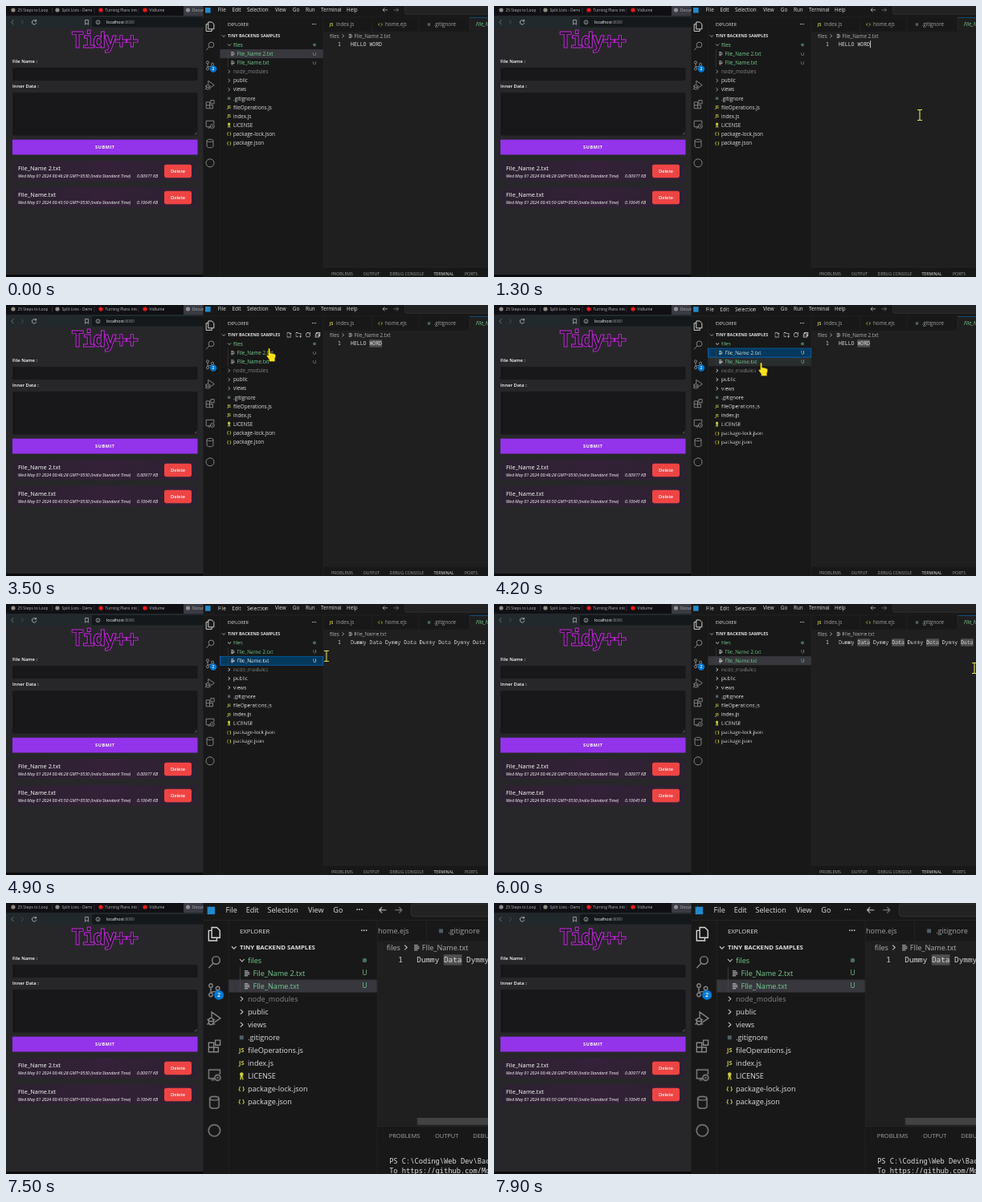
An HTML page for the animation above (8000 ms loop, 600 by 338 pixels).

```html
<!DOCTYPE html>
<html lang="en">
<head>
<meta charset="utf-8">
<title>File manager demo</title>
<style>
html, body { margin: 0; width: 100%; height: 100%; overflow: hidden; background: #181818; }
svg { display: block; width: 100vw; height: 100vh; font-family: "Open Sans", "Noto Sans", sans-serif; font-weight: 500; }
text { white-space: pre; }
.mono { font-family: "Noto Sans Mono", "DejaVu Sans Mono", monospace; }
.step { animation: 8s step-end infinite; }
.move { animation: pointer 8s linear infinite; }

/* editor zoom levels */
.zoom { animation-name: zoom; }
@keyframes zoom {
  0% { transform: scale(1); } 81.25% { transform: scale(1.2); } 82.5% { transform: scale(1.44); }
  83.75% { transform: scale(1.728); } 92.5%, 100% { transform: scale(1.44); }
}
.nav { animation-name: nav; }
@keyframes nav {
  0% { transform: translateX(230px); } 81.25% { transform: translateX(188px); } 82.5% { transform: translateX(157.6px); }
  83.75% { transform: translateX(129.3px); } 92.5%, 100% { transform: translateX(157.6px); }
}
.more { animation-name: more; }
@keyframes more {
  0% { opacity: 0; transform: translateX(150px); } 81.25% { opacity: 1; transform: translateX(150px); }
  82.5% { opacity: 1; transform: translateX(134.5px); } 83.75% { opacity: 1; transform: translateX(95.5px); }
  92.5%, 100% { opacity: 1; transform: translateX(134.5px); }
}
.tabs { animation-name: tabs; }
@keyframes tabs {
  0% { transform: none; } 81.25% { transform: translateX(-21px); } 92.5%, 100% { transform: translateX(-76.5px); }
}
.base { animation-name: base; }
@keyframes base { 0% { opacity: 1; } 81.25%, 100% { opacity: 0; } }
.zoomed { animation-name: zoomed; }
@keyframes zoomed { 0% { opacity: 0; } 81.25%, 100% { opacity: 1; } }
.small { animation-name: small; }
@keyframes small { 0% { opacity: 1; } 82.5%, 100% { opacity: 0; } }
.fits { animation-name: fits; }
@keyframes fits { 0% { opacity: 1; } 83.75% { opacity: 0; } 92.5%, 100% { opacity: 1; } }
.tight { animation-name: tight; }
@keyframes tight { 0% { opacity: 0; } 83.75% { opacity: 1; } 92.5%, 100% { opacity: 0; } }

/* explorer and document states */
.picked { animation-name: picked; }
@keyframes picked { 0% { opacity: 1; } 12%, 100% { opacity: 0; } }
.repicked { animation-name: repicked; }
@keyframes repicked { 0% { opacity: 0; } 65%, 100% { opacity: 1; } }
.hover { animation-name: hover; }
@keyframes hover { 0% { opacity: 0; } 50% { opacity: 1; } 55%, 100% { opacity: 0; } }
.focus { animation-name: focus; }
@keyframes focus {
  0% { opacity: 0; transform: none; } 45% { opacity: 1; transform: none; }
  55% { opacity: 1; transform: translateY(11.15px); } 65%, 100% { opacity: 0; transform: none; }
}
.lit0 { animation-name: lit0; }
@keyframes lit0 { 0% { fill: #78cd90; } 45% { fill: #e6f2ea; } 55%, 100% { fill: #78cd90; } }
.lit1 { animation-name: lit1; }
@keyframes lit1 { 0% { fill: #78cd90; } 55% { fill: #e6f2ea; } 65%, 100% { fill: #78cd90; } }
.tools { animation-name: tools; }
@keyframes tools { 0% { opacity: 0; } 40.5% { opacity: 1; } 61%, 100% { opacity: 0; } }
.first { animation-name: first; }
@keyframes first { 0% { opacity: 1; } 55%, 100% { opacity: 0; } }
.second { animation-name: second; }
@keyframes second { 0% { opacity: 0; } 55%, 100% { opacity: 1; } }
.caret { animation-name: caret; }
@keyframes caret { 0% { opacity: 0; } 12% { opacity: 1; } 23.75%, 100% { opacity: 0; } }
.word { animation-name: word; }
@keyframes word { 0% { opacity: 0; } 23.75% { opacity: 1; } 55%, 100% { opacity: 0; } }

/* pointer */
@keyframes pointer {
  0%, 8.75% { transform: translate(620px, 110px); }
  11.9%, 17.5% { transform: translate(530px, 136px); }
  22.5%, 25% { transform: translate(461px, 50px); }
  28.75%, 37.5% { transform: translate(472px, -20px); }
  42.5%, 47.5% { transform: translate(330px, 62px); }
  52.5%, 58.75% { transform: translate(335px, 80px); }
  63.75%, 66.25% { transform: translate(462px, 50px); }
  75%, 81% { transform: translate(598px, 80px); }
  85% { transform: translate(600.5px, 89px); }
  90% { transform: translate(602px, 92px); }
  93%, 100% { transform: translate(625px, 95px); }
}
.beam { animation-name: beam; }
@keyframes beam { 0% { opacity: 1; } 40.5% { opacity: 0; } 61% { opacity: 1; } 81.25%, 100% { opacity: 0; } }
</style>
</head>
<body>
<svg id="stage" viewBox="0 0 600 338" preserveAspectRatio="none"></svg>
<script>
const attr = (name, value) => value ? ` ${name}="${value}"` : '';

// y is the middle of the line of text
const text = (x, y, s, size, fill, more = '') =>
  `<text x="${x}" y="${(y + size * 0.35).toFixed(2)}" font-size="${size}"${attr('fill', fill)} ${more}>${s}</text>`;
const rect = (x, y, w, h, fill, more = '') =>
  `<rect x="${x}" y="${y}" width="${w}" height="${h}" fill="${fill}" ${more}/>`;
const line = (d, stroke = '#d4d4d4', width = 0.7, more = '') =>
  `<path d="${d}" fill="none" stroke="${stroke}" stroke-width="${width}" ${more}/>`;
const dot = (x, y, r, fill) => `<circle cx="${x}" cy="${y}" r="${r}" fill="${fill}"/>`;
const at = (x, y, s) => `<g transform="translate(${x} ${y})">${s}</g>`;
const step = (name, s) => `<g class="step ${name}">${s}</g>`;
const mono = (x, y, s, size, fill) => text(x, y, s, size, fill, 'class="mono"');

const GREEN = '#78cd90', GREY = '#868686', LIGHT = '#dedede', EDGE = '#2b2b2b';
const UI = 6.3, PITCH = 11.15, CHAR = 3.9;
const rowY = i => 52.4 + PITCH * i;

const icons = {
  js: text(0, 0, 'JS', 5, '#cbcb41', 'text-anchor="middle" font-weight="700"'),
  json: text(0, -0.3, '{ }', 5.2, '#cbcb41', 'text-anchor="middle" font-weight="700"'),
  ejs: line('M-.8 -1.6L-2.6 0L-.8 1.6M.8 -1.6L2.6 0L.8 1.6', '#cbcb41', 0.8),
  git: rect(-1.7, -1.7, 3.4, 3.4, '#4f6068'),
  key: dot(0, -1.6, 1.6, '#cbcb41') + line('M-.4 -.5L-1 3M.4 -.5L1.1 3', '#cbcb41', 1),
  txt: line('M-2.2 -2H1M-2.2 -.6H2.2M-2.2 .8H2.2M-2.2 2.2H.8', '#c5c8c6', 0.7),
  open: line('M-2 -1L0 1.1L2 -1'),
  shut: line('M-1 -2L1.1 0L-1 2')
};

function explorer() {
  const plain = [
    ['shut', 'node_modules', '#868686'], ['shut', 'public'], ['shut', 'views'], ['git', '.gitignore'],
    ['js', 'fileOperations.js'], ['js', 'index.js'], ['key', 'LICENSE'],
    ['json', 'package-lock.json'], ['json', 'package.json']
  ];
  const file = (i, name) => at(40.3, rowY(i), icons.txt) +
    `<g class="step lit${i - 1}">` + text(45.4, rowY(i), name, UI) + text(140, rowY(i), 'U', 5.8) + '</g>';
  const bar = (i, fill, more) => rect(24.4, rowY(i) - PITCH / 2, 128.4, PITCH, fill, more);
  const tools =
    at(110, 41.2, line('M.8 -2.8H-2V2.8H2.2V0M.4 -1.4H3.4M1.9 -2.9V.1')) +
    at(122, 41.2, line('M0 2H-3V-2.6H-.7L.2 -1.7H3V.4M1 2H4M2.5 .5V3.5')) +
    at(134, 41.2, line('M1.5 -2.2A2.7 2.7 0 1 0 2.7 .2M2.6 -3V-1H.6')) +
    at(146, 41.2, line('M-1.5 -1.3V-2.7H2.8V1.4H1.4M-2.8 -1.3H1.4V2.8H-2.8ZM-1.8 .8H.4'));
  return rect(24.4, 17.8, 128.6, 400, '#181818') + line('M24.4 17.8V400M153 17.8V400', EDGE, 0.5) +
    text(34, 27, 'EXPLORER', 5.4, LIGHT) +
    text(138.5, 26.6, '···', 7, LIGHT, 'font-weight="700"') +
    at(29, 41.4, icons.open) + text(34, 41.4, 'TINY BACKEND SAMPLES', 5.4, LIGHT, 'font-weight="700"') +
    step('tools', tools) +
    step('picked', bar(1, '#37373d')) + step('repicked', bar(2, '#37373d')) + step('hover', bar(2, '#2a2d2e')) +
    step('focus', bar(1, '#04395e', 'stroke="#0078d4" stroke-width=".7"')) +
    at(36, rowY(0), icons.open) + text(41, rowY(0), 'files', UI, GREEN) + dot(142, rowY(0), 1.9, '#49705a') +
    line(`M34.3 ${rowY(0.5)}V${rowY(2.5)}`, '#4a4a4a', 0.5) +
    file(1, 'File_Name 2.txt') + file(2, 'FIle_Name.txt') +
    plain.map(([icon, name, fill], i) =>
      at(35.6, rowY(i + 3), icons[icon]) + text(41, rowY(i + 3), name, UI, fill || LIGHT)).join('');
}

function activityBar() {
  const y = i => 29.7 + 24.3 * i;
  const glyph = (i, d, color = GREY) => at(12, y(i), line(d, color, 1.1, 'transform="scale(.88)"'));
  const late =
    glyph(5, 'M1 4H-5.5V-4.5H5.5V0M-3 5.5H0M6 3.2A2.8 2.8 0 1 1 .4 3.2A2.8 2.8 0 1 1 6 3.2M2.2 3.2H4.2') +
    glyph(6, 'M-4.5 -4C-4.5 -6.5 4.5 -6.5 4.5 -4V4C4.5 6.5 -4.5 6.5 -4.5 4ZM-4.5 -4C-4.5 -1.6 4.5 -1.6 4.5 -4') +
    `<circle cx="12" cy="${y(7)}" r="5" fill="none" stroke="${GREY}"/>`;
  return rect(0, 17.8, 24.2, 400, '#181818') +
    glyph(0, 'M-2.5 -6.5H2.5L5.5 -3.5V3.5H-2.5ZM-2.5 -3.5H-5.5V6.5H2.5V3.5', '#d7d7d7') +
    glyph(1, 'M5.5 -1.8A3.8 3.8 0 1 1 -2.1 -1.8A3.8 3.8 0 1 1 5.5 -1.8M-1 1L-5.5 5.8') +
    glyph(2, 'M-1.6 -4.5A1.8 1.8 0 1 1 -5.2 -4.5A1.8 1.8 0 1 1 -1.6 -4.5M-1.6 4.5A1.8 1.8 0 1 1 -5.2 4.5A1.8 1.8 0 1 1 -1.6 4.5' +
      'M5.2 -1.8A1.8 1.8 0 1 1 1.6 -1.8A1.8 1.8 0 1 1 5.2 -1.8M-3.4 -2.7V2.7M3.4 0C3.4 2 -3.4 1 -3.4 2.7') +
    dot(16, y(2) + 4.2, 4.2, '#0078d4') + text(16, y(2) + 4.2, '2', 5, '#fff', 'text-anchor="middle" font-weight="600"') +
    glyph(3, 'M-2.5 -1V-6L6 0L0 4M-5.5 2A2.3 2.3 0 0 1 -.9 2V4A2.3 2.3 0 0 1 -5.5 4ZM-5.5 3H-.9M-7 1L-5.5 2M.6 1L-.9 2M-7 6L-5.5 5M.6 6L-.9 5') +
    glyph(4, 'M-5.5 -3.5H-.5V5.5H-5.5ZM-5.5 1H4V5.5H-.5M1 -6H5.8V-1.2H1Z') +
    step('fits', late) +
    step('tight', [-3.8, 0, 3.8].map(d => dot(12 + d, y(5), 0.9, GREY)).join(''));
}

function titleBar() {
  const item = (x, s) => text(x, 9.1, s, UI, LIGHT);
  return rect(0, 0, 500, 17.8, '#181818') + line('M0 17.8H500', EDGE, 0.5) +
    rect(6, 6, 6.6, 6.6, '#2489ca') +
    item(21.8, 'File') + item(39.4, 'Edit') + item(58, 'Selection') +
    step('fits', item(93, 'View') + item(114.8, 'Go')) + step('small', item(131, 'Run')) +
    step('base', item(150, 'Terminal') + item(182, 'Help')) +
    step('more', text(0, 8.8, '···', 7, LIGHT, 'font-weight="700"')) +
    step('nav', rect(-5, 0, 300, 17.4, '#181818') +
      line('M3 8.9H-3M-.6 6.4L-3 8.9L-.6 11.4') +
      line('M10.5 8.9H16.5M14.1 6.4L16.5 8.9L14.1 11.4', '#8a8a8a') +
      rect(24.5, 3.4, 260, 11, '#222', 'rx="2.5" stroke="#3c3c3c" stroke-width=".5"'));
}

function editor() {
  const tab = (x, icon, s) => at(x, 27, icons[icon]) + text(x + 6, 27, s, UI, '#a2a2a2');
  const tabs = rect(335, 17.8, 90, 18, '#1f1f1f') + line('M335 18.2H425', '#0078d4', 0.8) +
    line('M214 18V35.6M272 18V35.6M335 18V35.6', EDGE, 0.5) +
    tab(163, 'js', 'index.js') + tab(224, 'ejs', 'home.ejs') + tab(284.5, 'git', '.gitignore') +
    text(343, 27, 'File_Name 2.txt', UI, GREEN, 'font-style="italic"');
  const mark = i => rect(187 + CHAR * i, 47.2, CHAR * 4, 9.4, '#505050');
  const doc = (name, body) => text(191.5, 41.4, name, UI, '#b0b0b0') + mono(187, 51.7, body, 6.5, '#dcdcdc');
  return rect(153, 17.8, 350, 18, '#181818') + step('tabs', tabs) +
    rect(153, 35.6, 350, 400, '#1f1f1f') +
    text(161, 41.4, 'files', UI, '#b0b0b0') + at(177.5, 41.4, icons.shut) + at(187, 41.4, icons.txt) +
    mono(171, 51.7, '1', 6.5, LIGHT) +
    step('word', mark(6)) + step('repicked', [6, 17, 28, 39].map(mark).join('')) +
    step('first', doc('File_Name 2.txt', 'HELLO WORD')) +
    step('second', doc('FIle_Name.txt', 'Dummy Data Dymmy Data Dummy Data Dymmy Data')) +
    step('caret', rect(187 + CHAR * 10, 47.2, 0.8, 9.2, '#ddd'));
}

// drawn upwards from the bottom edge of the window
function panel() {
  const tab = (x, s, fill = '#a2a2a2') => text(x, -100, s, 5.2, fill);
  const log = lines => lines.map((s, i) => mono(163.3, -78 + 8.75 * i, s, 6.05, LIGHT)).join('');
  const prompt = 'PS C:\\Coding\\Web Dev\\Backend';
  return step('zoomed', rect(187.5, -115, 300, 6, '#434343')) +
    rect(153.3, -108, 350, 110, '#181818') + line('M153 -108H503', EDGE, 0.5) +
    tab(163, 'PROBLEMS') + tab(202.7, 'OUTPUT') + tab(235.6, 'DEBUG CONSOLE') +
    tab(290.5, 'TERMINAL', '#e7e7e7') + tab(329, 'PORTS') + rect(290.5, -95.5, 27, 0.6, '#0078d4') +
    step('fits', log([prompt, 'To https://github.com/Mo'])) +
    step('tight', log([prompt, 'Compressing objects: 100%', 'Writing objects: 100%']));
}

function browser() {
  const tab = (x, color, s, w) => dot(x, 5, 2.6, color) +
    `<svg x="${x + 5}" y="0" width="${w}" height="12">${text(0.5, 5, s, 4.9, '#b9b9be')}</svg>`;
  const card = (y, name, date, size) =>
    rect(8, y, 230.5, 25, 'url(#card)', 'rx="2"') +
    text(15, y + 9.2, name, 7.4, '#fff') +
    text(15, y + 18.8, date + ' GMT+0530 (India Standard Time)', 5.25, '#fff', 'font-style="italic"') +
    text(163, y + 18.8, size + ' KB', 5.25, '#fff', 'font-style="italic"') +
    rect(197, y + 4.8, 34, 16.4, '#ef4444', 'rx="2.4"') +
    text(214, y + 13, 'Delete', 5.7, '#fff', 'text-anchor="middle" font-weight="600"');
  const label = (y, s) => text(8, y, s, 5.8, '#fff', 'font-weight="600"');
  return rect(0, 0, 245.5, 338, '#27272a') + rect(0, 0, 245.5, 12, '#101014') +
    rect(221, 0, 24.5, 12, '#3b3b43') +
    line('M57.5 2V9M110 2V9M165 2V9', '#3b3b43', 0.6) +
    tab(9, '#8f8a82', '25 Steps to Loops', 38) + tab(64, '#8f8a82', 'Split Lists - Demo', 38) +
    tab(118, '#f01818', 'Turning Plans into', 40) + tab(173, '#f01818', 'Vidlume', 30) +
    tab(226.5, '#8d8d94', 'Document', 14) +
    rect(0, 12, 245.5, 15.5, '#22292d') + rect(107, 14, 139, 12.5, '#14181b', 'rx="2"') +
    line('M9.3 17.5L6.8 20.3L9.3 23.1', '#85858c', 0.8) + line('M19 17.5L21.5 20.3L19 23.1', '#55555c', 0.8) +
    line('M37 18.4A2.7 2.7 0 1 0 37.8 20.8M37.6 17V19H35.6', '#c8c8cc', 0.8) +
    line('M98.6 17.5H102.4V23.2L100.5 21.6L98.6 23.2Z', '#c8c8cc', 0.7) +
    `<circle cx="114.5" cy="20.3" r="2.4" fill="none" stroke="#c8c8cc" stroke-width=".7"/>` +
    line('M114.5 19.9V21.8M114.5 18.7V19.2', '#c8c8cc', 0.6) +
    text(125, 20.3, 'localhost<tspan fill="#909096">:8080</tspan>', 5.2, '#fff') +
    `<text x="81" y="52" font-size="27" letter-spacing="-2.7" font-weight="700" fill="#251a2a" stroke="#c92be0"
      stroke-width=".9" style="font-family:'DejaVu Sans Mono',monospace">Tidy++</text>` +
    label(69.3, 'File Name :') + rect(8, 77, 230.5, 16, '#18181b', 'rx="1.5"') +
    label(100.4, 'Inner Data :') + rect(8, 108, 230.5, 53.5, '#18181b', 'rx="1.5"') +
    line('M234.8 160.3L237.6 157.5M236.5 160.3L237.6 159.2', '#aaa', 0.5) +
    rect(8, 166.7, 230.5, 18.8, '#9333ea') +
    text(123.3, 176.2, 'SUBMIT', 5.6, '#fff', 'text-anchor="middle" font-weight="700" letter-spacing=".5"') +
    card(193, 'File_Name 2.txt', 'Wed May 01 2024 00:46:28', '0.00977') +
    card(226, 'FIle_Name.txt', 'Wed May 01 2024 00:43:50', '0.10645') +
    rect(0, 335, 245.5, 3, '#0c0c0e');
}

function pointer() {
  const beam = line('M-3 -6.5H-.6L0 -6L.6 -6.5H3M0 -6V6M-3 6.5H-.6L0 6L.6 6.5H3', '#e6e65c', 1.1);
  const hand = `<path d="M-3.6 -7.5Q-2.4 -8.6 -1.3 -7.5V-2.2L4 -1Q6 -.4 5.8 1.6L4.8 5V8.5H-2.4V6L-5.6 1.8Q-5.4 0 -3.6 .8Z"
    fill="#ffe21a" stroke="#3a3200" stroke-width=".5"/>`;
  return `<g class="move">${step('beam', beam) + step('tools', hand) + step('zoomed', hand)}</g>`;
}

document.getElementById('stage').innerHTML =
  `<defs><linearGradient id="card"><stop stop-color="#2b222f"/><stop offset=".5" stop-color="#342138"/>
   <stop offset="1" stop-color="#2b222f"/></linearGradient></defs>` +
  at(242, -4, step('zoom', editor() + activityBar() + explorer() + titleBar())) +
  at(242, 434, step('zoom', panel())) +
  browser() + pointer();
</script>
</body>
</html>
```
